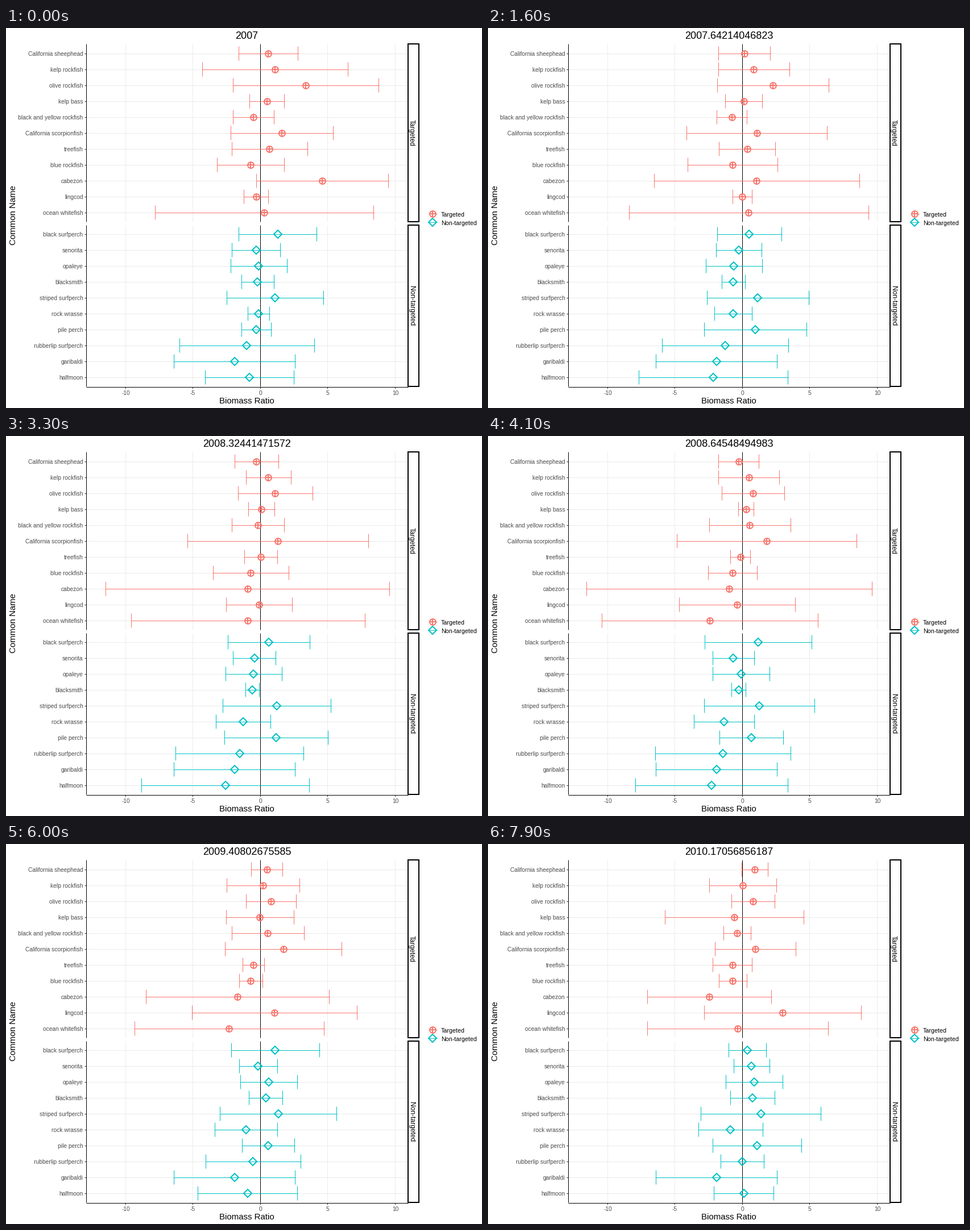
These frames come from a looping animation (837x669 px, 8000 ms). A matplotlib script:

```python
import numpy as np
import matplotlib.pyplot as plt
from matplotlib.animation import FuncAnimation
from matplotlib.collections import LineCollection
from matplotlib.patches import Rectangle

W, H = 837, 669
FRAMES, INTERVAL = 80, 100
TURN = 75  # frame of the 2010 survey
RED, TEAL = "#F8766D", "#00BFC4"
GRID, LABEL, TICK = "#EBEBEB", "#4D4D4D", "#333333"
LEFT, RIGHT, ZERO, UNIT = 141, 707, 447, 23.7
STEP, CAP = 28, 12

# Each species: key points of the mean ratio and of the half-width,
# spread evenly from 2007 to 2010
TARGETED = {
    "California sheephead": ([.6, -.4, 1.1], [2.2, .9]),
    "kelp rockfish": ([1.1, 0], [5.4, 1.1, 2.9, 2.4]),
    "olive rockfish": ([3.4, .8, .8], [5.4, 2.4, 1.5]),
    "kelp bass": ([.5, -.1, .5, -.8], [1.3, 1.4, .1, 6.1]),
    "black and yellow rockfish": ([-.5, -.9, 1.4, -.7], [1.5, .9, 4.2, .4]),
    "California scorpionfish": ([1.6, .8, 2.4, .7], [3.8, 7.1, 2.5]),
    "treefish": ([.7, -.8], [2.8, 1.7, .2, 1.7]),
    "blue rockfish": ([-.7], [2.5, 3.8, .7, 1.1]),
    "cabezon": ([4.6, -.9, -1, -2.7], [4.9, 11.3, 3.8]),
    "lingcod": ([-.3, .2, -.7, 3.7], [.9, .6, 6.4, 5.7]),
    "ocean whitefish": ([.3, .6, -4.1, .4], [8.1, 9.3, 7.3, 6.6]),
}
OTHERS = {
    "black surfperch": ([1.3, .1, 1.8, .1], [2.9, 2.1, 5, .7]),
    "senorita": ([-.3, -.2, -.9, 1], [1.8, 1.3]),
    "opaleye": ([-.1, -.9, .4, 1], [2.1]),
    "blacksmith": ([-.2, -.9, .1, .9], [1.2, .4, 1.8]),
    "striped surfperch": ([1.1, 1.4], [3.6, 4.5]),
    "rock wrasse": ([-.1, -1.4, -.8], [.8, 2.2, 2.4]),
    "pile perch": ([-.3, 1.7, .1, 1.3], [1.1, 5.3, .7, 3.8]),
    "rubberlip surfperch": ([-1, -1.6, .2], [5, 4.5, 5.3, .9]),
    "garibaldi": ([-1.9], [4.5]),
    "halfmoon": ([-.8, -2.9, -1.9, .5], [3.3, 6.8, 5, 1.7]),
}

plt.rcParams["font.family"] = "Liberation Sans"
plt.rcParams["path.simplify"] = False
fig = plt.figure(figsize=(W / 72, H / 72), dpi=72, facecolor="white")
ax = fig.add_axes([0, 0, 1, 1])
ax.set(xlim=(0, W), ylim=(H, 0))
ax.axis("off")


def hline(x0, x1, y, color, z=1):
    ax.plot([x0, x1], [y + .5] * 2, color=color, lw=1, solid_capstyle="butt", zorder=z)


def vline(x, y0, y1, color, z=1):
    ax.plot([x + .5] * 2, [y0, y1], color=color, lw=1, solid_capstyle="butt", zorder=z)


def text(x, y, s, size, color="black", ha="center", rot=0):
    return ax.text(x, y, s, size=size, color=color, ha=ha, va="baseline",
                   rotation=rot, rotation_mode="anchor", zorder=6)


def points(markers, color):
    return [ax.plot([], [], m, ms=size, mew=2, mfc="none", mec=color, zorder=5)[0]
            for m, size in markers]


def along(keys, t):
    return np.interp(t, np.linspace(0, TURN, len(keys)), keys)


class Panel:
    def __init__(self, name, top, bottom, first, species, color, markers, key_y):
        self.paths = list(species.values())
        self.rows = first + STEP * np.arange(len(species))
        self.frame(name, top, bottom, species)
        self.legend(name, key_y, color, markers)
        self.marks = points(markers, color)
        self.bars = LineCollection([], colors=color, linewidths=1, zorder=4)
        ax.add_collection(self.bars, autolim=False)

    def frame(self, name, top, bottom, species):
        for x in ticks.values():
            vline(x, top, bottom, GRID)
        for y, label in zip(self.rows, species):
            hline(LEFT, RIGHT, y, GRID)
            hline(LEFT - 3, LEFT, y, TICK)
            text(135.5, y + 5, label, 10.25, LABEL, "right")
        vline(ZERO, top, bottom, "black", 2)
        vline(LEFT, top, bottom, "black", 2)
        ax.add_patch(Rectangle((RIGHT, top), 19, bottom - top, fc="white",
                               ec="black", lw=2, zorder=3))
        text(710, (top + bottom) / 2, name, 12, rot=270)

    def legend(self, name, y, color, markers):
        hline(743, 758, y, color, 4)
        for mark in points(markers, color):
            mark.set_data([750.5], [y + .5])
        text(765, y + 6, name, 10.6, ha="left")

    def move(self, t):
        mid = np.array([along(mean, t) for mean, _ in self.paths]) * UNIT + ZERO + .3
        half = np.array([along(width, t) for _, width in self.paths]) * UNIT
        segs = []
        for a, b, y in zip(np.floor(mid - half), np.floor(mid + half), self.rows):
            segs.append([(a, y + .5), (b + 1, y + .5)])
            segs += [[(x + .5, y - CAP), (x + .5, y + CAP + 1)] for x in (a, b)]
        self.bars.set_segments(segs)
        for mark in self.marks:
            mark.set_data(np.floor(mid) + .5, self.rows + .5)


ticks = {v: int(ZERO + v * UNIT) for v in (-10, -5, 0, 5, 10)}
panels = [
    Panel("Targeted", 28, 341, 44, TARGETED, RED, [("o", 10.8), ("+", 10.8)], 326),
    Panel("Non-targeted", 347, 631, 362, OTHERS, TEAL, [("D", 10)], 341),
]

hline(LEFT, RIGHT, 631, "black", 2)
for v, x in ticks.items():
    vline(x, 632, 635, TICK)
    text(x + .5, 645.5, str(v), 10.25, LABEL)
text(423, 661, "Biomass Ratio", 15)
text(17.5, 329.5, "Common Name", 15, rot=90)
title = text(423.5, 19, "", 18)


def update(k):
    title.set_text(f"{2007 + 12 * k / 299:.15g}")
    # Past the last survey the values swing back the way they came
    t = TURN - abs(TURN - k)
    for panel in panels:
        panel.move(t)
    return [title]


anim = FuncAnimation(fig, update, frames=FRAMES, interval=INTERVAL,
                     repeat=True, repeat_delay=0)
plt.show()
```
